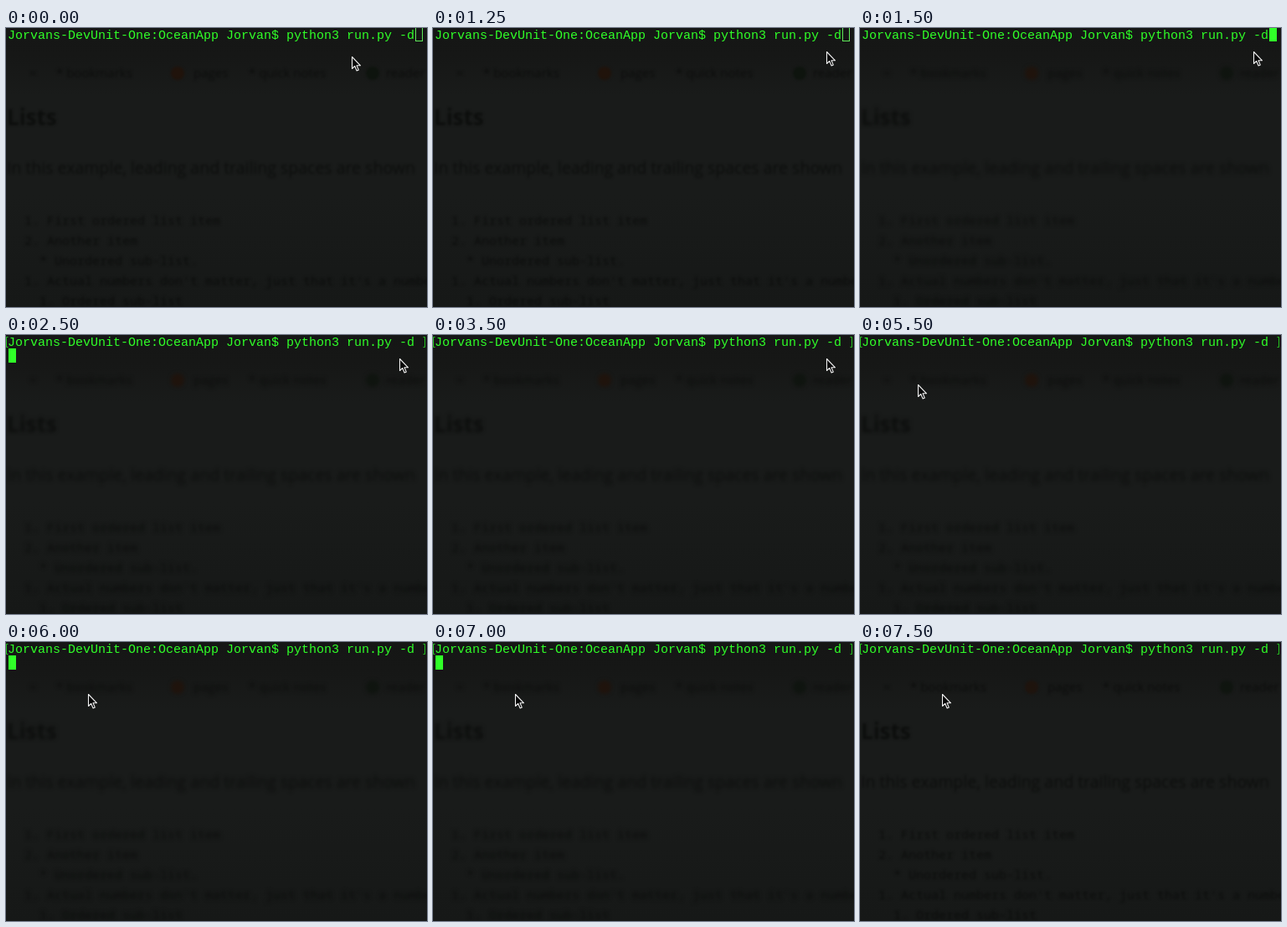
Recreate the animation shown at these times as an HTML page with a canvas. Size 503x333 px, loop 8000 ms.

```html
<!DOCTYPE html>
<html lang="en">
<head>
<meta charset="utf-8">
<title>Terminal</title>
<style>
  html, body { margin: 0; width: 100%; height: 100%; overflow: hidden; background: #181a19; }
  canvas { display: block; }
</style>
</head>
<body>
<canvas id="stage" width="503" height="333"></canvas>
<script>
const W = 503, H = 333, LOOP = 8000;
const GREEN = '#30ff28';
const PROMPT = 'Jorvans-DevUnit-One:OceanApp Jorvan$ python3 run.py -d';
const ctx = document.getElementById('stage').getContext('2d');

// Blurred page showing through the translucent window
function makeBackdrop(blur, iconStrength) {
  const layer = document.createElement('canvas');
  layer.width = W;
  layer.height = H;
  const g = layer.getContext('2d');
  const shade = g.createLinearGradient(0, 0, 0, H);
  shade.addColorStop(0, '#151615');
  shade.addColorStop(0.1, '#161716');
  shade.addColorStop(0.24, '#191b1a');
  shade.addColorStop(0.6, '#191b1a');
  shade.addColorStop(1, '#161817');
  g.fillStyle = shade;
  g.fillRect(0, 0, W, H);

  g.filter = `blur(${blur}px)`;
  const put = (text, x, y, font) => {
    g.font = font;
    g.fillText(text, x, y);
  };
  const dot = (x, color) => {
    g.globalAlpha = iconStrength;
    g.fillStyle = color;
    g.beginPath();
    g.arc(x, 54, 8, 0, Math.PI * 2);
    g.fill();
  };
  dot(205, '#20130b');
  dot(438, '#0e140e');

  g.globalAlpha = 0.75;
  g.fillStyle = '#080908';
  const small = '15px "Open Sans", sans-serif';
  const mono = '15px "Noto Sans Mono", monospace';
  put('=', 28, 59, small);
  put('* bookmarks', 60, 59, small);
  put('pages', 224, 59, small);
  put('* quick notes', 290, 59, small);
  put('reader', 454, 59, small);
  put('Lists', 1, 116, 'bold 26px "Open Sans", sans-serif');
  put('In this example, leading and trailing spaces are shown', 1, 174,
      '19.5px "Open Sans", sans-serif');
  put('1. First ordered list item', 22, 235, mono);
  put('2. Another item', 22, 259, mono);
  put('* Unordered sub-list.', 40, 283, mono);
  put("1. Actual numbers don't matter, just that it's a number", 22, 307, mono);
  put('1. Ordered sub-list', 40, 331, mono);
  return layer;
}

const idle = makeBackdrop(1.6, 1);
const focused = makeBackdrop(2, 0.9);
const settled = makeBackdrop(1.8, 0.8);

// Start time, x, y; no position means the pointer is hidden
const pointerSteps = [
  [0, 413, 34], [250, 436, 45], [500, 456, 35], [750, 470, 19],
  [1000, 471, 19], [1250, 470, 28], [4500],
  [5250, 85, 50], [5500, 69, 59], [5750], [6000, 98, 62]
];

const arrow = new Path2D('M0 0V14L3.2 11L5.6 16.5L7.8 15.6L5.5 10.3H10Z');

function drawPointer(t) {
  const [, x, y] = pointerSteps.filter(step => step[0] <= t).pop();
  if (x === undefined) return;
  ctx.save();
  ctx.translate(x + 0.5, y + 0.5);
  ctx.fillStyle = '#050505';
  ctx.strokeStyle = '#f4f4f4';
  ctx.lineWidth = 1.1;
  ctx.lineJoin = 'round';
  ctx.fill(arrow);
  ctx.stroke(arrow);
  ctx.restore();
}

function drawCaret(t) {
  ctx.fillStyle = GREEN;
  if (t < 1500) {
    ctx.strokeStyle = '#5fe85a';
    ctx.lineWidth = 1;
    ctx.strokeRect(489.5, -0.5, 8, 16);
  } else if (t < 2000) {
    ctx.fillRect(489, 0, 9, 16);
  } else if (t >= 2500) {
    const blinkOn = t < 3500 || Math.floor(t / 500) % 2 === 0;
    if (blinkOn) ctx.fillRect(3, 16, 9, 17);
  }
}

function drawMark(x, dir) {
  ctx.strokeStyle = '#26c420';
  ctx.lineWidth = 1;
  ctx.beginPath();
  ctx.moveTo(x - 2 * dir, 2.5);
  ctx.lineTo(x, 2.5);
  ctx.lineTo(x, 14.5);
  ctx.lineTo(x - 2 * dir, 14.5);
  ctx.stroke();
}

function draw(t) {
  ctx.drawImage(t < 1500 ? idle : t < 7500 ? focused : settled, 0, 0);
  ctx.font = '15px "Liberation Mono", monospace';
  ctx.fillStyle = GREEN;
  ctx.fillText(PROMPT, 2, 13);
  if (t >= 2500) {
    drawMark(0.5, -1);
    drawMark(500.5, 1);
  }
  drawCaret(t);
  drawPointer(t);
}

const start = performance.now();
function tick() {
  draw((performance.now() - start) % LOOP);
  requestAnimationFrame(tick);
}
tick();
</script>
</body>
</html>
```
